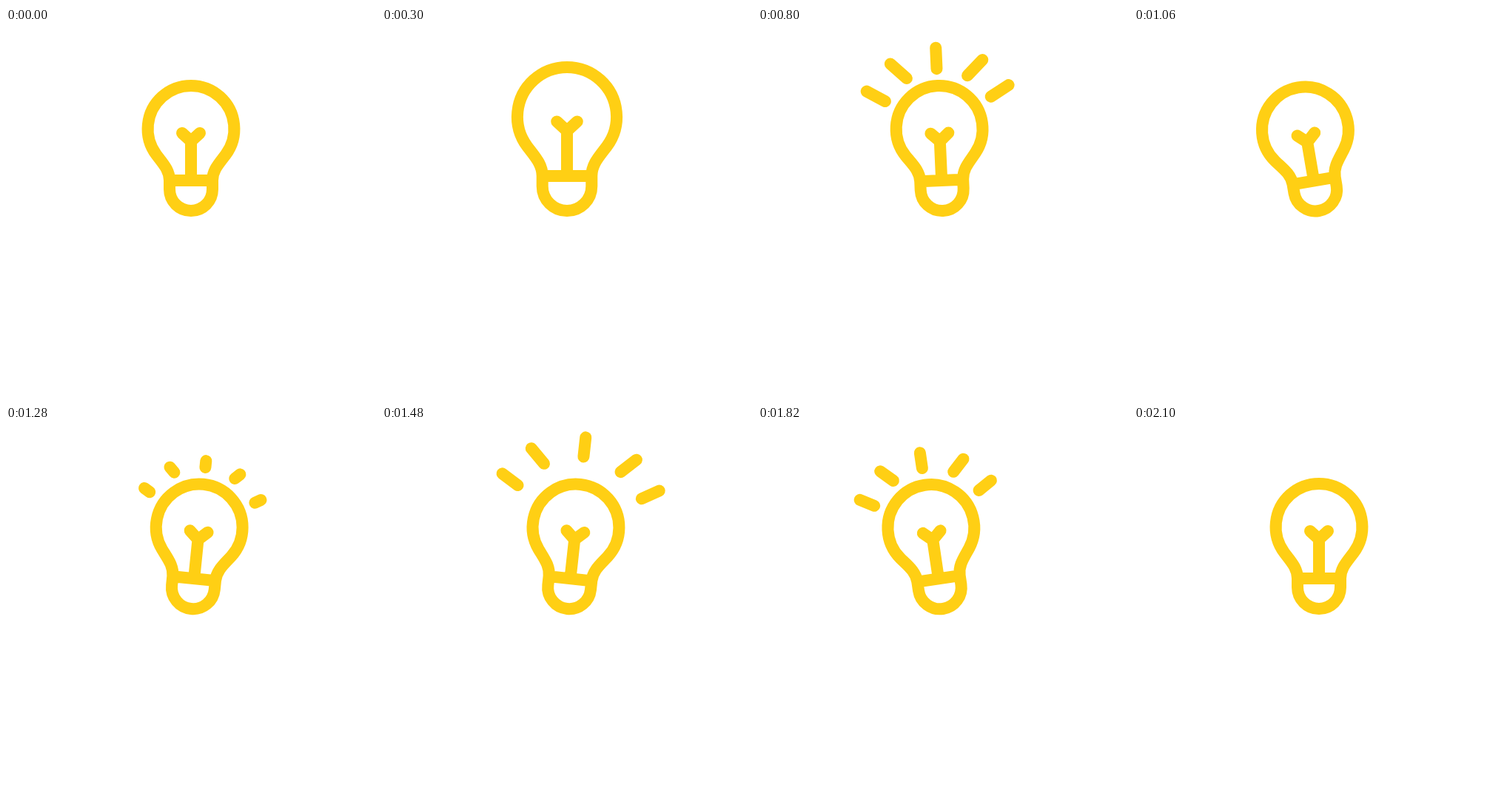
These frames come from a looping animation (500x500 px, 2.82 s). An HTML page with a canvas:

```html
<!DOCTYPE html>
<html lang="en">
<head>
<meta charset="utf-8">
<title>Light bulb</title>
<style>
html, body { margin: 0; width: 100%; height: 100%; overflow: hidden; background: #fff; }
canvas { display: block; width: 100vmin; height: 100vmin; }
</style>
</head>
<body>
<canvas id="stage" width="500" height="500"></canvas>
<script>
const ctx = document.getElementById('stage').getContext('2d');
const LOOP = 2820, STEP = 20, STROKE = 16, DEG = Math.PI / 180;

const clamp = x => Math.min(1, Math.max(0, x));
const mix = (a, b, k) => a + (b - a) * k;
const ease = x => x * x * (3 - 2 * x);
const ramp = (t, start, length) => ease(clamp((t - start) / length));

// Shapes are relative to the pivot at the foot of the bulb.
const bulb = new Path2D(
  'M-29 -41 C-29 -55 -38 -64 -47 -76 A58.4 58.4 0 1 1 47 -76 ' +
  'C38 -64 29 -55 29 -41 V-29 A29 29 0 0 1 -29 -29 Z H29 ' +
  'M0 -41 V-94 M-12 -105 L0 -94 L12 -105');

// The bulb grows, holds and drops back.
const scaleAt = t => 1 + 0.2 * (ramp(t, 20, 420) - ramp(t, 535, 155));

// Then it swings from side to side and comes to rest.
const SWING_START = 685, SWING_TIME = 349, swing = [0, -10, 10, -10, 0];

function angleAt(t) {
  const x = clamp((t - SWING_START) / SWING_TIME / 4) * 4;
  const i = Math.min(3, Math.floor(x));
  return mix(swing[i], swing[i + 1], ease(x - i)) * DEG;
}

// Each burst draws five rays outwards, then wipes them from the inside.
const RAY_TIME = 175, bursts = [678, 1242, 1730];

function polar(radius, degrees) {
  const a = degrees * DEG;
  return [radius * Math.sin(a), -109 - radius * Math.cos(a)];
}

function drawRays(t) {
  for (const start of bursts) {
    const x = (t - start) / RAY_TIME;
    if (x <= 0 || x >= 2) continue;
    ctx.beginPath();
    for (let i = -2; i <= 2; i++) {
      const tilt = 5.5 * Math.sin(i * Math.PI / 2); // only the middle pair leans outwards
      const [x0, y0] = polar(83, i * 29.7), [x1, y1] = polar(124, i * 29.7 + tilt);
      const at = k => [mix(x0, x1, k), mix(y0, y1, k)];
      ctx.moveTo(...at(clamp(x - 1)));
      ctx.lineTo(...at(clamp(x)));
    }
    ctx.stroke();
  }
}

function draw(now) {
  const t = Math.floor(now % LOOP / STEP) * STEP;
  const scale = scaleAt(t);
  ctx.clearRect(0, 0, 500, 500);
  ctx.save();
  ctx.translate(250, 247);
  ctx.rotate(angleAt(t));
  ctx.scale(scale, scale);
  ctx.lineWidth = STROKE / scale; // the line keeps its weight while the bulb grows
  ctx.strokeStyle = '#ffcf14';
  ctx.lineCap = ctx.lineJoin = 'round';
  ctx.stroke(bulb);
  drawRays(t);
  ctx.restore();
}

const begin = performance.now();
function tick() {
  draw(performance.now() - begin);
  requestAnimationFrame(tick);
}
tick();
</script>
</body>
</html>
```
